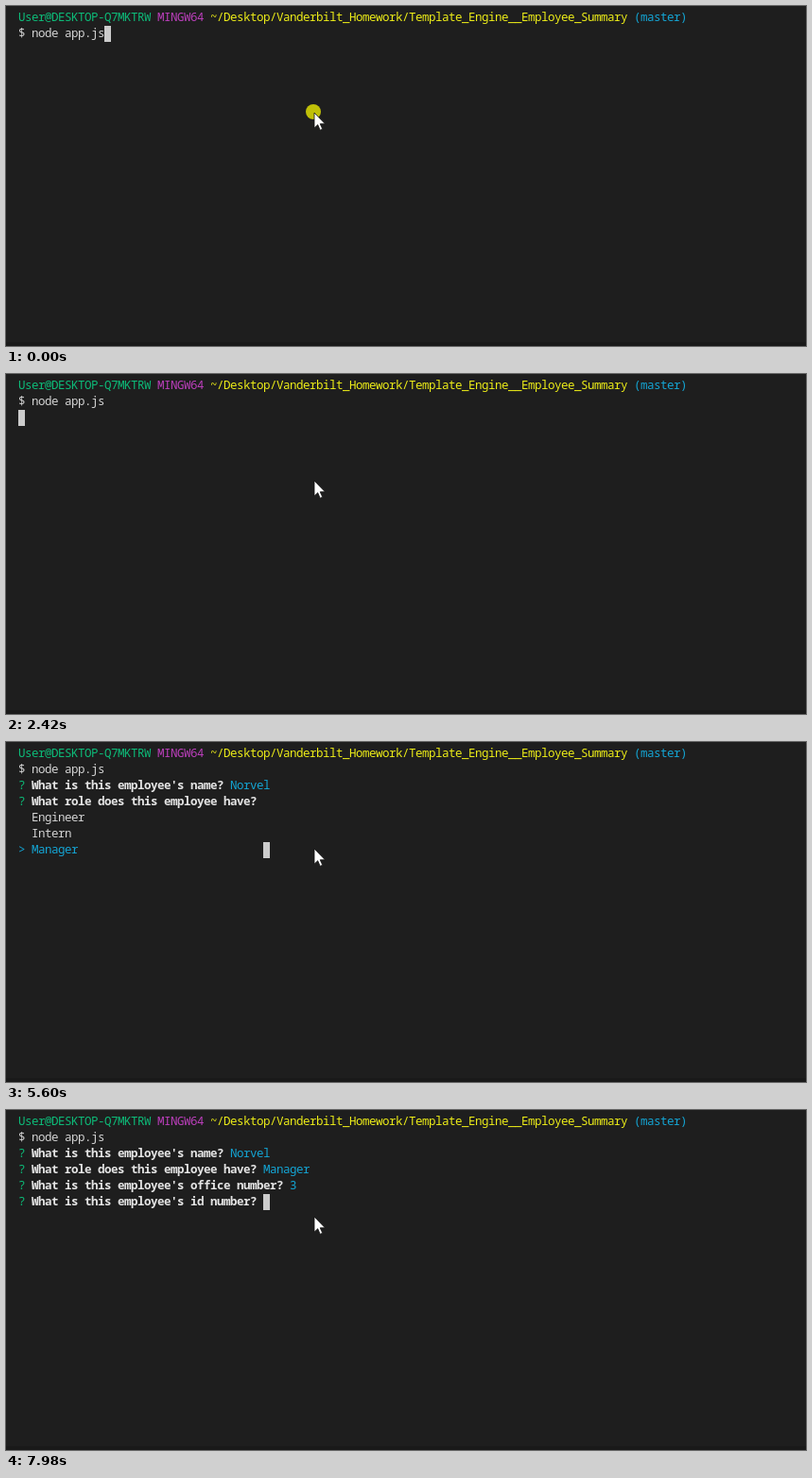
Recreate the animation shown at these times as an HTML page. Size 846 px wide and 360 px high, loop 8 s.

```html
<!DOCTYPE html>
<html lang="en">
<head>
<meta charset="utf-8">
<title>Terminal prompt</title>
<style>
  html, body { margin: 0; width: 100%; height: 100%; overflow: hidden; background: #1e1e1e; }
  #stage { position: relative; width: 846px; height: 360px; overflow: hidden; }
  #stage::after { content: ""; position: absolute; left: 0; right: 0; top: 356px; bottom: 0; background: #191919; }
  pre {
    position: absolute; left: 13px; top: 3px; margin: 0; color: #d4d4d4;
    font: 500 12.5px/17px "Noto Sans Mono", "DejaVu Sans Mono", monospace;
    letter-spacing: -.5px; font-variant-ligatures: none;
  }
  #caret { position: absolute; width: 7px; height: 17px; background: #ccc; }
  svg { position: absolute; left: 0; top: 0; }
  .green { color: #0dbc79; }
  .magenta { color: #bc3fbc; }
  .yellow { color: #eded18; }
  .cyan { color: #14a5d4; }
  .dim { color: #808080; }
  b { color: #e5e5e5; }
</style>
</head>
<body>
<div id="stage">
  <div id="caret"></div>
  <pre id="screen"></pre>
  <svg width="846" height="360">
    <circle id="ripple" cx="325" cy="112" fill="#ff0"/>
    <path d="M325.5 112.5v16.2l3.7-3.5 2.5 5.7 2.5-1.1-2.5-5.5h5.2z" transform="translate(.5 .5)" fill="#fff" stroke="#111" stroke-width=".8"/>
  </svg>
</div>
<script>
const LOOP = 8000, CELL = 7, ROW = 17, LEFT = 13, TOP = 4;
const NAME = "Norvel";
const ROLES = ["Engineer", "Intern", "Manager"];
const QUESTIONS = {
  name: "What is this employee's name?",
  role: "What role does this employee have?",
  office: "What is this employee's office number?",
  id: "What is this employee's id number?"
};

const paint = (color, text) => `<span class="${color}">${text}</span>`;
const ask = (key, rest = "") => `${paint("green", "?")} <b>${QUESTIONS[key]}</b> ${rest}`;
const answer = (key, text) => ask(key, paint("cyan", text));
const endOf = (key, extra = 0) => QUESTIONS[key].length + 3 + extra;

const shell = [
  [paint("green", "User@DESKTOP-Q7MKTRW"), paint("magenta", "MINGW64"),
   paint("yellow", "~/Desktop/Vanderbilt_Homework/Template_Engine__Employee_Summary"),
   paint("cyan", "(master)")].join(" "),
  "$ node app.js"
];
const named = [...shell, answer("name", NAME)];
const placed = [...named, answer("role", "Manager")];
const numbered = [...placed, answer("office", "3")];

// Each step: start time, screen lines, caret column, caret row.
const steps = [];
const show = (time, lines, col, row) =>
  steps.push({ time, html: lines.join("\n"), col, row });

const prompt = (time, before, key, typed = "") =>
  show(time, [...before, ask(key, typed)], endOf(key, typed.length), before.length);

const blank = (time, before) => show(time, before, 0, before.length);

// The prompt line is cleared and printed again on every key.
const press = (time, before, key, typed) => {
  blank(time, before);
  prompt(time + 20, before, key, typed.slice(0, -1));
  prompt(time + 40, before, key, typed);
};

const accept = (time, before, after, key, length) => {
  blank(time, before);
  show(time + 20, after, endOf(key, length), before.length);
  blank(time + 40, after);
};

const menu = (time, chosen, hint = "") => {
  const items = ROLES.map((role, i) =>
    i === chosen ? paint("cyan", "> " + role) : "  " + role);
  show(time, [...named, ask("role", paint("dim", hint)), ...items],
    endOf("role", hint.length), named.length + ROLES.length);
};

show(0, shell, 13, 1);
blank(780, shell);
prompt(1070, shell, "name");
[...NAME].forEach((_, i) => press(2420 + i * 130, shell, "name", NAME.slice(0, i + 1)));
accept(3400, shell, named, "name", NAME.length);
menu(3580, 0, "(Use arrow keys)");
menu(4490, 1);
blank(4800, named);
menu(4820, 2);
accept(6160, named, placed, "role", 7);
prompt(6220, placed, "office");
press(7600, placed, "office", "3");
accept(7910, placed, numbered, "office", 1);
prompt(7970, numbered, "id");

const [screenBox, caret, ripple] = ["screen", "caret", "ripple"].map(id => document.getElementById(id));
let shown;

function draw(now) {
  const t = now % LOOP;
  const step = steps.findLast(s => s.time <= t);
  if (step !== shown) {
    shown = step;
    screenBox.innerHTML = step.html;
    caret.style.left = LEFT + step.col * CELL + "px";
    caret.style.top = TOP + step.row * ROW + "px";
  }
  const tick = Math.min(11, Math.floor(t / 20));
  ripple.setAttribute("r", 8 + 2 * tick);
  ripple.setAttribute("opacity", 0.72 * (1 - tick / 11));
}

const start = performance.now();
function frame() {
  draw(performance.now() - start);
  requestAnimationFrame(frame);
}
frame();
</script>
</body>
</html>
```
